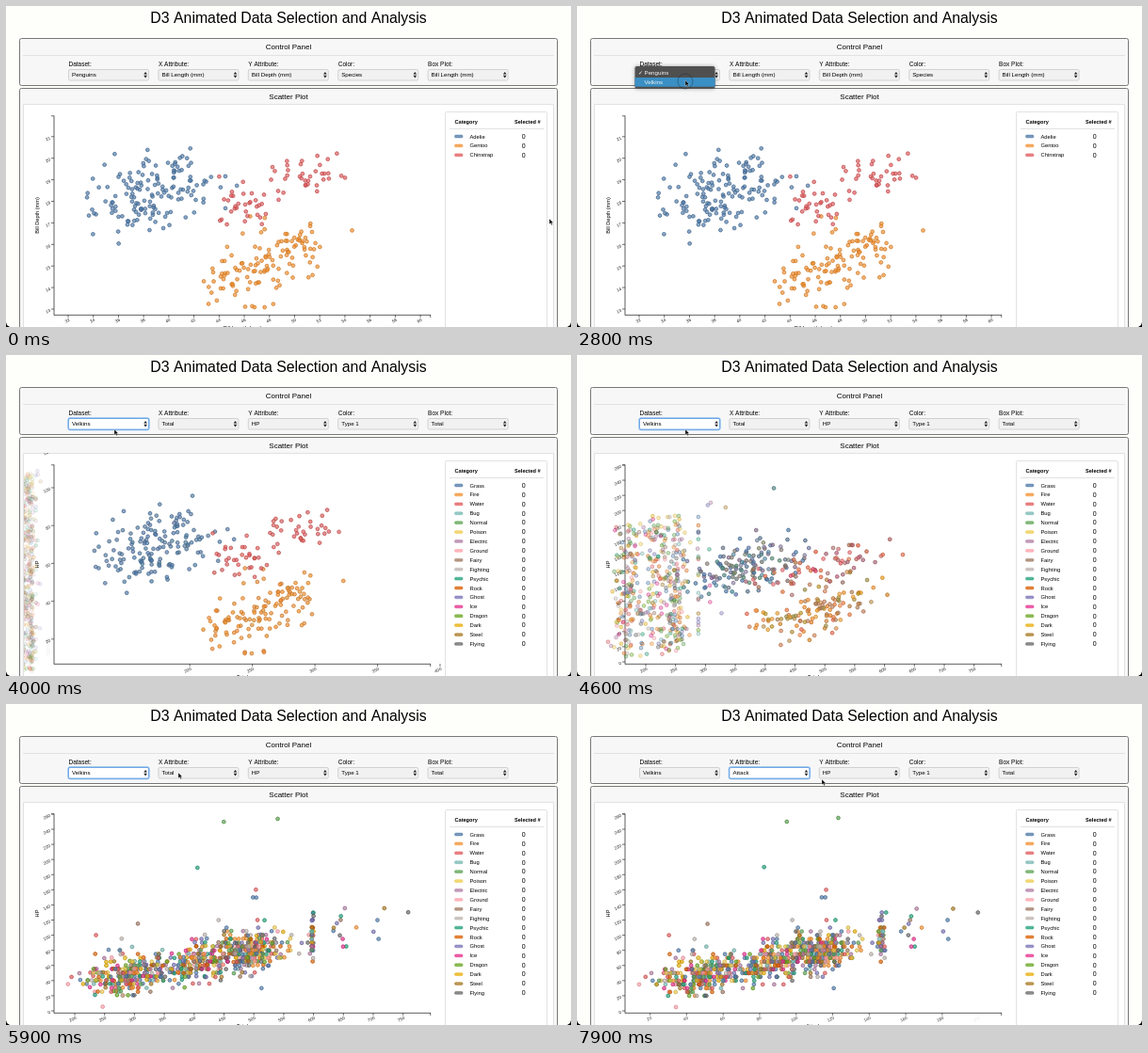
An HTML page with a canvas for the animation above (8000 ms loop, 600 px wide and 341 px high).

```html
<!DOCTYPE html>
<html lang="en">
<head>
<meta charset="utf-8">
<title>D3 Animated Data Selection and Analysis</title>
<style>
html, body { margin: 0; height: 100%; overflow: hidden; background: #fefefa; }
canvas { display: block; width: 600px; height: 341px; }
</style>
</head>
<body>
<canvas id="stage"></canvas>
<script>
const LOOP = 8000, SWITCH_DATA = 3240, SWITCH_X = 7200;
const AXIS_MS = 1000, POINT_MS = 3000;
const PAGE = '#fefefa', PANEL = '#f7f7f8', BORDER = '#777', RULE = '#e2e2e2';
const MENUS = [
  { from: 2250, to: SWITCH_DATA, x: 61.5, w: 85, items: ['Penguins', 'Velkins'] },
  { from: 6150, to: SWITCH_X, x: 156, w: 87,
    items: ['Total', 'HP', 'Attack', 'Defense', 'Sp. Atk', 'Sp. Def', 'Speed', 'Generation'] }
];
const CURSOR_MOVES = [
  { at: 700, ms: 1300, x: 110, y: 73 },
  { at: 2350, ms: 350, x: 115, y: 79 },
  { at: 5200, ms: 600, x: 183, y: 73 },
  { at: 6250, ms: 350, x: 180, y: 91 },
  { at: 7200, ms: 500, x: 260, y: 80 }
];
const TYPES = ['Grass', 'Fire', 'Water', 'Bug', 'Normal', 'Poison', 'Electric', 'Ground', 'Fairy', 'Fighting',
  'Psychic', 'Rock', 'Ghost', 'Ice', 'Dragon', 'Dark', 'Steel', 'Flying'];
// Tableau10 followed by Dark2
const COLORS = ('4e79a7 f28e2c e15759 76b7b2 59a14f edc949 af7aa1 ff9da7 9c755f bab0ab ' +
  '1b9e77 d95f02 7570b3 e7298a 66a61e e6ab02 a6761d 666666').split(' ')
  .map(hex => [0, 2, 4].map(i => parseInt(hex.slice(i, i + 2), 16)));
// Males lie (dx, dy) from the species centre, females the opposite way
const SPECIES = [
  { name: 'Adelie', count: 151, x: 157, y: 200, dx: 20, dy: -13, spread: 25 },
  { name: 'Gentoo', count: 123, x: 276, y: 272, dx: 28, dy: -17, spread: 22 },
  { name: 'Chinstrap', count: 68, x: 287, y: 195, dx: 31, dy: -17, spread: 18 }
];

const range = (from, to, step) => Array.from({ length: (to - from) / step + 1 }, (_, i) => from + i * step);
const AXES = {
  billLength: { scale: v => 66 + (v - 32) * 13.36, ticks: range(32, 60, 2) },
  billDepth: { scale: v => 322 - (v - 13) * 22.9, ticks: range(13, 21, 1) },
  total: { scale: v => 73 + (v - 200) * 0.634, ticks: range(200, 750, 50) },
  attack: { scale: v => 50 + v * 2.095, ticks: range(20, 180, 20) },
  hp: { scale: v => 326 - v * 0.804, ticks: range(0, 260, 20) }
};

const lerp = (a, b, p) => a + (b - a) * p;
const clamp = (v, min, max) => Math.max(min, Math.min(max, v));
function ease(u) {
  u = clamp(u, 0, 1);
  return u < .5 ? 4 * u ** 3 : 1 - 4 * (1 - u) ** 3;
}

let seed = 20;
function rand() {
  seed = (seed + 0x6D2B79F5) | 0;
  let r = Math.imul(seed ^ seed >>> 15, 1 | seed);
  r = r + Math.imul(r ^ r >>> 7, 61 | r) ^ r;
  return ((r ^ r >>> 14) >>> 0) / 4294967296;
}
const gauss = (mean, sd) => mean + sd * Math.sqrt(-2 * Math.log(1 - rand())) * Math.cos(2 * Math.PI * rand());

const penguins = SPECIES.flatMap((s, color) => Array.from({ length: s.count }, (_, i) => {
  const sex = i % 2 ? 1 : -1;
  return {
    x: clamp(gauss(s.x + sex * s.dx, s.spread), 66, 434),
    y: clamp(gauss(s.y + sex * s.dy, s.spread * .7), 126, 320),
    color
  };
}));

// Totals gather around evolution stages; hit points grow with the total
function creature() {
  const r = rand();
  const sum = clamp(r < .34 ? gauss(295, 42) : r < .54 ? gauss(410, 28) : r < .92 ? gauss(490, 28) :
    r < .96 ? 600 : gauss(640, 60), 182, 780);
  const bonus = rand() < .05 ? 60 * rand() : 0;
  const life = clamp(Math.round((gauss(sum * .157, 13) + bonus) / 5) * 5, 5, 170);
  return { sum, life, strength: clamp(gauss(sum * .182, 18), 8, 188), type: Math.floor(18 * rand() ** 1.3) };
}
const points = Array.from({ length: 800 }, (_, i) => {
  const data = creature();
  const start = penguins[i] || { x: 11, y: 115 + rand() * 226, color: data.type };
  return { ...data, start, isNew: i >= penguins.length };
});
Object.assign(points[121], { sum: 450, life: 250, strength: 5, type: 4 });
Object.assign(points[261], { sum: 540, life: 255, strength: 10, type: 4 });
Object.assign(points[217], { sum: 405, life: 190, strength: 33, type: 10 });

const canvas = document.getElementById('stage');
const ctx = canvas.getContext('2d');
const dpr = window.devicePixelRatio || 1;
canvas.width = 600 * dpr;
canvas.height = 341 * dpr;

function text(str, x, y, size, { align = 'left', weight = '', color = '#000', angle = 0 } = {}) {
  ctx.save();
  ctx.translate(x, y);
  ctx.rotate(angle);
  ctx.font = `${weight} ${size}px "Liberation Sans", Arial, sans-serif`;
  ctx.textAlign = align;
  ctx.fillStyle = color;
  ctx.fillText(str, 0, 0);
  ctx.restore();
}
function box(x, y, w, h, r, fill, stroke, width = 1) {
  ctx.beginPath();
  ctx.roundRect(x, y, w, h, r);
  if (fill) { ctx.fillStyle = fill; ctx.fill(); }
  if (stroke) { ctx.strokeStyle = stroke; ctx.lineWidth = width; ctx.stroke(); }
}
function line(x1, y1, x2, y2, color, width = 1) {
  ctx.beginPath();
  ctx.moveTo(x1, y1);
  ctx.lineTo(x2, y2);
  ctx.strokeStyle = color;
  ctx.lineWidth = width;
  ctx.stroke();
}
function circle(x, y, r, stroke, fill) {
  ctx.beginPath();
  ctx.arc(x, y, r, 0, 7);
  if (fill) { ctx.fillStyle = fill; ctx.fill(); }
  ctx.strokeStyle = stroke;
  ctx.lineWidth = .8;
  ctx.stroke();
}
function polygon(pts, fill) {
  ctx.beginPath();
  pts.forEach(([x, y]) => ctx.lineTo(x, y));
  ctx.closePath();
  ctx.fillStyle = fill;
  ctx.fill();
}

function drawPanels() {
  box(0, 0, 600, 341, 0, PAGE);
  text('D3 Animated Data Selection and Analysis', 300, 17.7, 15.85, { align: 'center' });
  box(14.5, 34.5, 571, 50, 2, PANEL, BORDER);
  line(18, 52.5, 582, 52.5, RULE);
  text('Control Panel', 300, 46.3, 8, { align: 'center' });
  box(14.5, 87.5, 571, 270, 2, PANEL, BORDER);
  box(18.5, 104.5, 563, 260, 0, '#fff', RULE);
  text('Scatter Plot', 300, 99.3, 8, { align: 'center' });
}

function drawSelects(t) {
  const after = t >= SWITCH_DATA;
  const values = after
    ? ['Velkins', t >= SWITCH_X ? 'Attack' : 'Total', 'HP', 'Type 1', 'Total']
    : ['Penguins', 'Bill Length (mm)', 'Bill Depth (mm)', 'Species', 'Bill Length (mm)'];
  const focus = t >= SWITCH_X ? 1 : after && t < MENUS[1].from ? 0 : -1;
  ['Dataset:', 'X Attribute:', 'Y Attribute:', 'Color:', 'Box Plot:'].forEach((label, i) => {
    const x = 66.5 + i * 95.4;
    text(label, x, 63.5, 6.5);
    if (i === focus) box(x - .2, 67.3, 85.4, 11.9, 2, null, '#8cbcf0', 2);
    box(x, 67.5, 85, 11.5, 1.5, i === focus ? '#fff' : '#f1f1f2', i === focus ? '#5b9be0' : '#c8c8c8', .8);
    text(values[i], x + 3.5, 75.2, 6.2);
    polygon([[x + 79.8, 72.6], [x + 81.6, 70], [x + 83.4, 72.6]], '#222');
    polygon([[x + 79.8, 73.8], [x + 81.6, 76.4], [x + 83.4, 73.8]], '#222');
  });
}

function drawTick(v, pos, alpha, vertical) {
  const style = { align: 'right', color: '#222', angle: -.45 };
  ctx.globalAlpha = alpha;
  if (vertical) {
    line(48, pos, 51, pos, '#333', .7);
    text(v, 47.5, pos + 2.5, 4.6, style);
  } else {
    line(pos, 328, pos, 331, '#333', .7);
    text(v, pos + 2, 334.5, 4.6, style);
  }
  ctx.globalAlpha = 1;
}
// Old ticks fade out and new ones fade in while both slide between the scales
function drawAxis(from, to, p, vertical) {
  for (const [axis, alpha] of [[from, 1 - p], [to, p]])
    if (alpha > 0)
      axis.ticks.forEach(v => drawTick(v, lerp(from.scale(v), to.scale(v), p), alpha, vertical));
}

function drawPoints(t) {
  const p = ease((t - SWITCH_DATA) / POINT_MS);
  const q = ease((t - SWITCH_X) / POINT_MS);
  for (const d of points) {
    if (d.isNew && p === 0) continue;
    const x = lerp(lerp(d.start.x, AXES.total.scale(d.sum), p), AXES.attack.scale(d.strength), q);
    const y = lerp(d.start.y, AXES.hp.scale(d.life), p);
    const rgb = COLORS[d.start.color].map((c, k) => lerp(c, COLORS[d.type][k], p));
    ctx.globalAlpha = d.isNew ? p ** .65 : 1;
    circle(x, y, 1.9, `rgba(${rgb.map(c => c * .85)},.95)`, `rgba(${rgb},.65)`);
  }
  ctx.globalAlpha = 1;
}

function drawPlot(t) {
  const after = t >= SWITCH_DATA, second = t >= SWITCH_X;
  const p = ease((t - SWITCH_DATA) / AXIS_MS);
  ctx.save();
  ctx.beginPath();
  ctx.rect(19, 104, 444, 237);
  ctx.clip();
  if (second) drawAxis(AXES.total, AXES.attack, ease((t - SWITCH_X) / AXIS_MS), false);
  else drawAxis(AXES.billLength, AXES.total, p, false);
  drawAxis(AXES.billDepth, AXES.hp, p, true);
  line(51, 116.5, 51, 328.5, '#333', .8);
  line(48, 116.8, 51, 116.8, '#333', .7);
  line(51, 328.3, 451, 328.3, '#333', .8);
  line(450.7, 328, 450.7, 331, '#333', .7);
  text(after ? 'HP' : 'Bill Depth (mm)', 35, 222.5, 5.6, { align: 'center', angle: -Math.PI / 2 });
  text(second ? 'Attack' : after ? 'Total' : 'Bill Length (mm)', 251, 344, 5.6, { align: 'center' });
  drawPoints(t);
  ctx.restore();
}

function drawLegend(t) {
  const names = t < SWITCH_DATA ? SPECIES.map(s => s.name) : TYPES;
  box(466.5, 112.5, 108, 250, 1, '#fff', RULE);
  text('Category', 476.5, 124.5, 5.6, { weight: 'bold' });
  text('Selected #', 540, 124.5, 5.6, { weight: 'bold' });
  line(471, 130.5, 571, 130.5, RULE);
  names.forEach((name, i) => {
    const y = 138.5 + i * 9.91;
    box(476.5, y - 1.4, 8.5, 2.8, 1.2, `rgba(${COLORS[i]},.75)`, `rgb(${COLORS[i]})`, .5);
    text(name, 492.5, y + 2, 5.8);
    text('0', 549.7, y + 2.3, 7, { align: 'center' });
  });
}

function drawMenu({ x, w, items }, cursorY) {
  const row = 9.9;
  const hover = Math.floor((cursorY - 66) / row);
  ctx.shadowColor = 'rgba(0,0,0,.35)';
  ctx.shadowBlur = 4;
  box(x, 64, w, items.length * row + 4, 2, 'rgba(76,76,76,.96)');
  ctx.shadowBlur = 0;
  items.forEach((item, i) => {
    const y = 66 + i * row;
    if (i === hover) box(x, y, w, row, 0, '#3a8fc4');
    if (i === 0) text('✓', x + 3.5, y + 7.2, 6, { color: '#fff' });
    text(item, x + 10, y + 7.2, 6.2, { color: '#f4f4f4' });
  });
}

function cursorAt(t) {
  let x = 577, y = 226;
  for (const move of CURSOR_MOVES) {
    const p = ease((t - move.at) / move.ms);
    x = lerp(x, move.x, p);
    y = lerp(y, move.y, p);
  }
  return [x, y];
}
function drawCursor(x, y) {
  const arrow = [[0, 0], [0, 5.8], [1.4, 4.6], [2.4, 6.8], [3.4, 6.3], [2.5, 4.2], [4.2, 4.2]];
  polygon(arrow.map(([a, b]) => [x + a, y + b]), '#000');
  ctx.strokeStyle = 'rgba(255,255,255,.8)';
  ctx.lineWidth = .4;
  ctx.stroke();
}

function draw(t) {
  ctx.setTransform(dpr, 0, 0, dpr, 0, 0);
  drawPanels();
  drawSelects(t);
  drawPlot(t);
  drawLegend(t);
  const [x, y] = cursorAt(t);
  MENUS.filter(m => t >= m.from && t < m.to).forEach(m => drawMenu(m, y));
  if (t >= 2700 && t < 3000) circle(x, y + 1, 8, 'rgba(20,40,55,.5)');
  drawCursor(x, y);
  for (const [corner, dir] of [[0, 1], [600, -1]])
    polygon([[corner, 336], [corner + dir, 339], [corner + 4 * dir, 341], [corner, 341]], '#000');
}

function frame() {
  draw(performance.now() % LOOP);
  requestAnimationFrame(frame);
}
frame();
</script>
</body>
</html>
```
